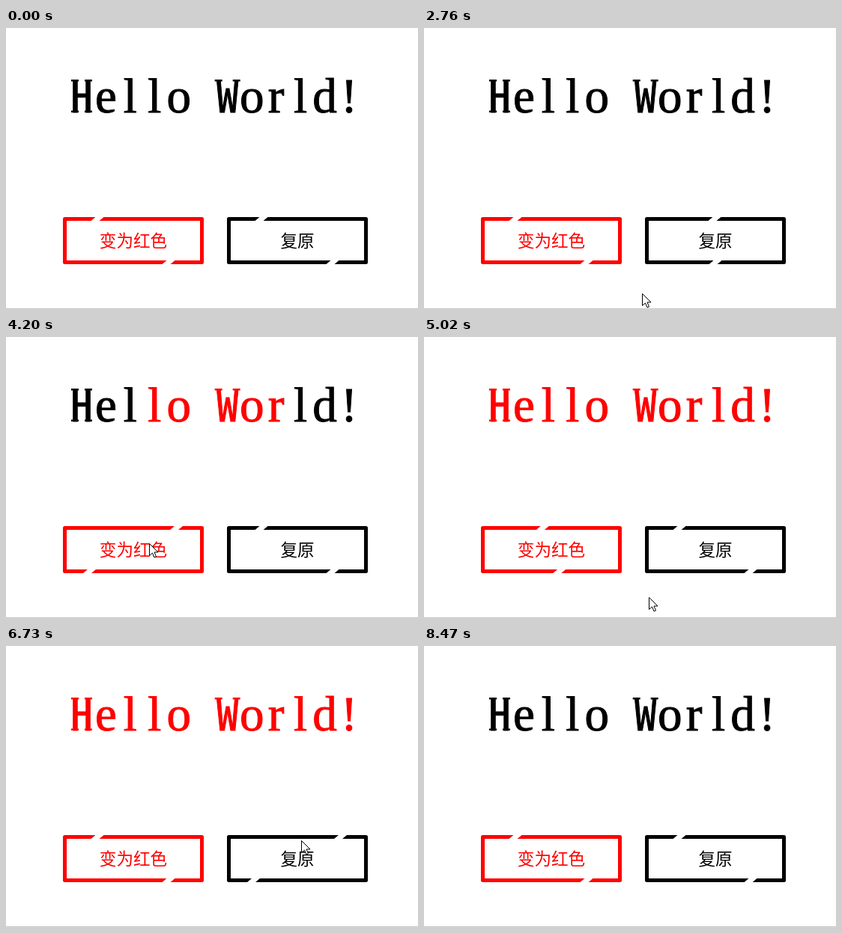
An HTML page with a canvas that plays this animation: 550 px wide and 376 px high, repeating every 8.87 s.

```html
<!DOCTYPE html>
<html lang="zh">
<head>
<meta charset="utf-8">
<style>
  html, body { margin: 0; width: 100%; height: 100%; overflow: hidden; background: #fff; }
  canvas { display: block; }
</style>
</head>
<body>
<canvas width="550" height="376"></canvas>
<script>
const ctx = document.querySelector('canvas').getContext('2d');
const LOOP = 8870, ENTRY = 460, RED = '#f00', BLACK = '#000';
const SERIF = '65px "Liberation Serif", serif';
const NARROW = '59px "Noto Sans Mono CJK SC", "Liberation Mono", monospace';
const LABEL = '300 22.6px "Noto Sans CJK SC", "Noto Sans CJK", sans-serif';

// Pointer glides: start, end, target x, target y
const glides = [
  [ENTRY, 710, 213, 295],
  [1400, 1800, 357, 294],
  [2530, 2830, 289, 357],
  [2880, 3480, 191, 276],
  [4660, 5210, 310, 354],
  [5590, 5920, 420, 270],
  [6000, 6330, 409, 273],
  [6640, 6730, 394, 260],
  [7200, 7340, 405, 290],
  [7620, 8000, 428, 378]
];

const buttons = [
  { x: 76, color: RED, label: '变为红色', toggles: [] },
  { x: 295, color: BLACK, label: '复原', toggles: [] }
];
const clicks = [3870, 6870];

const clamp = v => Math.min(1, Math.max(0, v));

function bezier(x1, y1, x2, y2) {
  const at = (a, b, s) => 3 * a * s * (1 - s) ** 2 + 3 * b * s * s * (1 - s) + s ** 3;
  return v => {
    let lo = 0, hi = 1;
    for (let i = 0; i < 20; i++) {
      const mid = (lo + hi) / 2;
      if (at(x1, x2, mid) < v) lo = mid; else hi = mid;
    }
    return at(y1, y2, lo);
  };
}
const ease = bezier(.25, .1, .25, 1);
const easeInOut = bezier(.42, 0, .58, 1);

function pointerAt(t) {
  let x = 263, y = 349;
  for (const [start, end, toX, toY] of glides) {
    const p = ease(clamp((t - start) / (end - start)));
    x += (toX - x) * p;
    y += (toY - y) * p;
  }
  return [x, y];
}

// Record when the pointer enters and leaves each button
for (let t = ENTRY; t < LOOP; t += 10) {
  const [px, py] = pointerAt(t);
  for (const { x, toggles } of buttons) {
    const inside = px > x && px < x + 188 && py > 253 && py < 316;
    if (inside !== (toggles.length % 2 === 1)) toggles.push(t);
  }
}

// Progress of a transition that reverses at each toggle time
function transition(t, toggles, duration, curve) {
  const i = toggles.findLastIndex(s => s <= t);
  if (i < 0) return 0;
  const p = clamp((t - toggles[i]) / duration);
  const v = p < 1 ? curve(p) : 1;
  return i % 2 ? 1 - v : v;
}

function polygon(points, fill, stroke) {
  ctx.beginPath();
  points.forEach(([x, y]) => ctx.lineTo(x, y));
  ctx.closePath();
  ctx.fillStyle = fill;
  ctx.fill();
  if (stroke) {
    ctx.strokeStyle = stroke;
    ctx.lineWidth = 1;
    ctx.stroke();
  }
}

function drawTitle(color) {
  ctx.fillStyle = ctx.strokeStyle = color;
  ctx.lineWidth = 1;
  [...'Hello World!'].forEach((ch, i) => {
    const x = 101 + i * 32.45;
    const narrow = /[HW]/.test(ch);
    ctx.font = narrow ? NARROW : SERIF;
    ctx.fillText(ch, x, 112.5);
    ctx.strokeText(ch, x, 112.5);
    if (!narrow) return;
    // Serifs at the stem ends
    const spread = ch === 'H' ? 9 : 12;
    for (const dx of [-spread, spread]) {
      ctx.fillRect(x + dx - 5, 69, 10, 2.5);
      if (ch === 'H') ctx.fillRect(x + dx - 5, 110.5, 10, 2.5);
    }
  });
}

function drawGap(x, y) {
  polygon([[x - 9, y + 6], [x - 2, y], [x + 9, y], [x + 2, y + 6]], '#fff');
}

function drawButton({ x, color, label, toggles }, t) {
  const shift = 105.5 * transition(t, toggles, 500, ease);
  ctx.strokeStyle = ctx.fillStyle = color;
  ctx.lineWidth = 5;
  ctx.lineJoin = 'round';
  ctx.strokeRect(x + 2.5, 255.5, 183, 58);
  ctx.lineJoin = 'miter';
  ctx.font = LABEL;
  ctx.fillText(label, x + 94, 293);
  drawGap(x + 46 + shift, 252.5);
  drawGap(x + 141 - shift, 310.5);
}

function drawPointer(t) {
  if (t < ENTRY) return;
  const [x, y] = pointerAt(t).map(v => Math.round(v) + .5);
  const arrow = [[0, 0], [0, 16], [4, 12.5], [6.5, 18.5], [9, 17.5], [6.5, 11.5], [11.5, 11.5]];
  polygon(arrow.map(([dx, dy]) => [x + dx, y + dy]), '#fff', BLACK);
}

function draw(t) {
  ctx.fillStyle = '#fff';
  ctx.fillRect(0, 0, 550, 376);
  ctx.textAlign = 'center';
  drawTitle(BLACK);

  // The red title opens from the middle and closes again
  const half = 190 * transition(t, clicks, 660, easeInOut);
  ctx.save();
  ctx.beginPath();
  ctx.rect(275.5 - half, 50, 2 * half, 90);
  ctx.clip();
  ctx.fillStyle = '#fff';
  ctx.fillRect(0, 50, 550, 90);
  drawTitle(RED);
  ctx.restore();

  buttons.forEach(b => drawButton(b, t));
  ctx.fillStyle = '#c8c8c8';
  ctx.fillRect(0, 375, 550, 1);
  drawPointer(t);
}

const start = performance.now();
function loop() {
  draw((performance.now() - start) % LOOP);
  requestAnimationFrame(loop);
}
loop();
</script>
</body>
</html>
```
